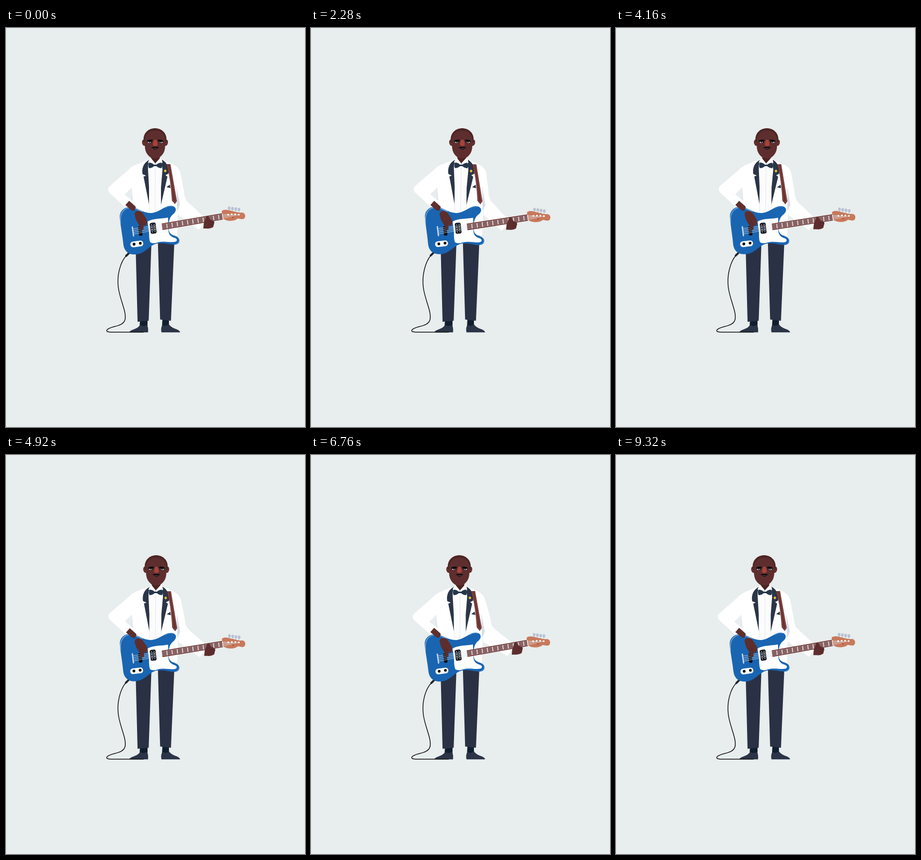
Recreate the animation shown at these times as an HTML page with a canvas. Size 600x800 px, loop 9.36 s.

```html
<!DOCTYPE html>
<html lang="en">
<head>
<meta charset="utf-8">
<title>Bass player</title>
<style>
  html, body { margin: 0; width: 100%; height: 100%; overflow: hidden; background: #e8eded; }
  canvas { display: block; width: 600px; height: 800px; }
</style>
</head>
<body>
<canvas id="stage" width="600" height="800"></canvas>
<script>
const ctx = document.getElementById('stage').getContext('2d');
const LOOP = 9360;
const INK = '#2b3547', CLOTH = '#2b3144', SKIN = '#5d2e2d', DEEP = '#4b2322';
const BLUE = '#1965b2', WOOD = '#6a302e', BLACK = '#0d0b0e', WHITE = '#fff';

function fill(color, d) {
  ctx.fillStyle = color;
  ctx.fill(new Path2D(d));
}

function line(color, width, d) {
  ctx.strokeStyle = color;
  ctx.lineWidth = width;
  ctx.stroke(new Path2D(d));
}

function oval(color, x, y, rx, ry = rx, turn = 0) {
  ctx.fillStyle = color;
  ctx.beginPath();
  ctx.ellipse(x, y, rx, ry, turn, 0, Math.PI * 2);
  ctx.fill();
}

// Rounded box centred on x, y
function box(color, x, y, w, h, r, turn) {
  group(() => {
    ctx.fillStyle = color;
    ctx.beginPath();
    ctx.roundRect(x - w / 2, y - h / 2, w, h, r);
    ctx.fill();
  }, 0, 0, turn, x, y);
}

function group(draw, dx, dy, angle = 0, px = 0, py = 0) {
  ctx.save();
  ctx.translate(px + dx, py + dy);
  ctx.rotate(angle);
  ctx.translate(-px, -py);
  draw();
  ctx.restore();
}

// Fretting hand offsets along the neck: [time, offset]
const slides = [[0, 0], [1480, -9], [3080, 0], [4160, 0], [5800, 4], [7880, 10.5], [9320, 0], [LOOP, 0]];

function slideAt(t) {
  const i = slides.findIndex(k => k[0] > t);
  const [t0, a] = slides[i - 1], [t1, b] = slides[i];
  const p = (t - t0) / (t1 - t0);
  return a + (b - a) * p * p * (3 - 2 * p);
}

function legs() {
  fill('#101f2f', 'M269 584H284V599H268Z M314 582H327V599H313Z');
  fill(INK, 'M247.5 610.3C249 604 264 605 269 595Q276 600 283 595Q286 601 285 610.3Z');
  fill(INK, 'M312 610.3Q310 601 314 595Q320 600 327 594C333 604 348 603 349.5 610.3Z');
  fill(CLOTH, 'M259.5 412H292.5L286.3 587L264 589Z M304.3 412H338.5L331 587L309.3 584.5Z');
}

function cable(dx, dy) {
  line(BLACK, 1.5, `M${242 + dx} ${456 + dy}C229 469 222 497 225.5 521C229 546 242 569 239 584
    C236 600 208 597 202.5 605.5C200 610 209 609.8 217 609.8H276`);
}

function jacket() {
  fill(WHITE, 'M285 264L266 272Q251 277 245 285L207 318Q202 325 208 331L243 363L255 348L238 334L252 320L256 380H343V345L347 283Q338 274 315 264Z');
  fill(WHITE, 'M256 365H345L343 416H290Z');
  fill('#e1e6ec', 'M252 321L254.5 347L251 344Z');
  fill('#fcfcfd', 'M287 268H312L312 368H287Z');
  line('#dfe2e7', 0.8, 'M299.5 280V366 M287.5 350V366 M311 352V364');
  fill(INK, 'M288 264C276 270 272 281 274 293L281 296L276 298L287 353L287 320L285 284L285 275Z');
  fill(INK, 'M313 264C324 270 327 281 326 292L320 295L324 298L311 354L311 320L314 284L313 275Z');
  fill(INK, 'M322 319L329 314L330 321Z');
  fill('#f4bd32', 'M319.5 283.3L322.5 286.5L319.5 289.7L316.5 286.5Z');
}

function fretArm(slide) {
  const dy = -slide * 0.22, elbow = slide * 0.5;
  fill(WHITE, `M325 270Q346 275 350 290L${357 + elbow} 327Q${358 + elbow} 341 ${363 + elbow} 347
    L${395 + slide} ${377 + dy}L${399 + slide} ${390 + dy}L${387 + slide} ${405 + dy}L346 375L342 330Z`);
  fill('#d6dce9', 'M342 318L349 354L344 366L343 350Z');
}

function strap() {
  fill(WOOD, 'M322 273L330 273L343 347L339 353L333 346Q330 300 322 273Z');
  line('#a87470', 0.6, 'M324.5 275Q331 302 335 345L339 350L341 346L329 275');
}

function neck(lean) {
  fill(DEEP, `M${291.5 + lean} 252H${308.5 + lean}L308.5 264L299.5 273L291 264Z`);
}

function collar() {
  fill(WHITE, 'M288 263L291 261L300 272L289 275L285 269Z M312 263L309 261L299 272L311 275L314 269Z');
  fill('#26364a', 'M287 270Q293 270 297 274H302Q306 270 312 270Q315 276 312 281Q306 281 302 277H297Q293 281 287 281Q284 276 287 270Z');
}

function head() {
  oval(SKIN, 277, 230, 4, 6.3, -0.2);
  oval(SKIN, 321, 230, 4, 6.3, 0.2);
  oval('#6c3633', 276.5, 230, 1.4, 3.2);
  oval('#6c3633', 321.5, 230, 1.4, 3.2);
  fill('#4d2524', 'M276 230V223C276 210 286.3 201 299 201C311.7 201 322 210 322 223V230Z');
  fill(SKIN, `M278 230C278 214 285 206 299 206C313 206 320 214 320 230L319 241
    C318 251 311 258 307 260Q299 263 291 260C287 258 280 251 279 241Z`);
  oval(BLACK, 288.5, 228.2, 4.6, 2.4);
  oval(BLACK, 310.5, 228.2, 4.6, 2.4);
  fill(WHITE, 'M284 228.6H291.5Q290 230.8 287.5 230.6Q285 230.6 284 228.6Z M307.5 228.6H315Q314 230.6 311.5 230.6Q309 230.8 307.5 228.6Z');
  oval(BLACK, 288.3, 229.2, 1.1);
  oval(BLACK, 310.8, 229.2, 1.1);
  line(BLACK, 2.5, 'M284 226.5Q288 224.5 293.5 225.2 M305.5 225.2Q311 224.5 315 226.5');
  fill('#a8423b', 'M296.5 225Q299.5 222.5 302.5 225L304.3 232Q305 236.5 299.5 236.5Q294 236.5 294.7 232Z');
  fill(BLACK, 'M292 241Q293 237.5 299 238.5Q306 237.5 307 241Q303 240 299.5 241Q296 240 292 241Z');
  fill(BLACK, 'M295 241Q299.5 239.5 304 241Q302 244 299.5 243.6Q297 244 295 241Z');
  line('#a9847f', 0.7, 'M297.5 241.6H301.5');
}

function guitarBody() {
  line('#1d2633', 4, 'M249 449L241 457');
  fill(BLUE, `M228.5 381C227 367 238 358 251 359C264 360 274 371 291 371C308 370 318 356 331 356.5
    C341 357 344 365 337 372C328 378 326 388 326.5 401C326 412 333 415 341 417.5C350 421 350 431 343 433.5
    C333 437 318 429 303 432C286 436 280 453 259 454C246 455 237 447 235.5 434C234 418 230 398 228.5 381Z`);
  line('#72a9df', 1.6, 'M230 392C227 371 237 360 251 360.5C260 361 266 366 273 368.5');
  line('#3d86cb', 1.2, 'M319 361Q327 356 334 358 M347 424Q348 431 341 433');
  fill(WHITE, `M284 388C296 381 312 383 325 380L326 402C325 416 333 419 339 421
    C344 423 344 427 340 428.5C331 431 319 426 304 430Q296 433 290 430Q287 427 287 410Z`);
  box(WHITE, 262.5, 433, 26, 11.5, 5.5, -0.13);
  oval(BLACK, 257, 433.4, 2.8);
  oval(BLACK, 269.5, 431.6, 2.8);
  box(BLACK, 269.5, 407, 7, 19, 2.5, -0.14);
  line('#c9d5e4', 2.6, 'M253.5 399L256 417');
  box('#17181f', 295.3, 401.3, 12, 22, 3.5, -0.12);
  for (let i = 0; i < 4; i++) {
    oval('#dfe3e9', 292 + i * 0.6, 394.5 + i * 4.8, 0.9);
    oval('#dfe3e9', 297.2 + i * 0.6, 393.8 + i * 4.8, 0.9);
  }
}

function guitarNeck() {
  for (let i = 0; i < 4; i++) oval('#b7c2d3', 448 + i * 6.5, 361.2 + i * 0.9, 2.7, 3.4);
  line('#b7c2d3', 1.2, 'M448 364V369 M454.5 365V370 M461 366V371 M467.5 367V372');
  fill('#c8795b', `M433 367C439 362 448 366 456 367.5C463 369 468 371 473 370
    C480 370 482 378 478 382C474 385 469 382 465 382C459 388 443 388 437 383L434 384Z`);
  oval('#a45a43', 455.5, 380, 1.7);
  fill(WOOD, 'M312.5 392L434 371.5L435 384L314 405Z');
  ctx.lineCap = 'butt';
  for (let i = 0; i < 11; i++) {
    const x = 323 + i * 10.4, y = 398.4 - (x - 313) * 0.169;
    line('#eee7e7', 1.7, `M${x - 0.6} ${y - 4.6}L${x + 0.6} ${y + 4.6}`);
  }
  for (let i = 0; i < 4; i++) {
    line('#d5dce5', 0.8, `M254 ${402.8 + i * 3.6}L313 ${394.2 + i * 2.8}L434 ${373.9 + i * 2.7}L${446 + i * 7} 374`);
  }
  line(WHITE, 1.3, 'M434 372L435.5 383');
  ctx.lineCap = 'round';
  for (let i = 0; i < 4; i++) oval(WHITE, 446 + i * 7, 374.2 - (i % 3 ? 0.7 : 0), 1.8);
}

function fretHand() {
  fill(SKIN, `M396 402L397 391L402 378Q405 375 407 379L410 384L417 387Q419 390 417 394
    L416 399Q410 403 403 402Z`);
  line(DEEP, 0.8, 'M409 389L417 390 M407 394L416 395');
}

function pluckArm(lift) {
  group(() => {
    fill(SKIN, 'M247 346.5L260 358Q261 362 256 367L251 365L239.5 355Z');
    line('#6d3835', 0.7, 'M246 350L256 359 M243 354L253 363');
  }, lift * 2, lift * 1.2);
  group(() => {
    fill(SKIN, `M258 374C258 366 266 365 273 369L282 383Q285 391 281 396Q278 398 276 394
      L276 403Q273 407 269 401L267 395L261 385Z`);
    line(DEEP, 0.8, 'M270 386L276 396 M267 389L272 402');
  }, 0, lift * 1.6, lift * -0.05, 264, 370);
}

function draw(t) {
  const sway = Math.sin(t * 0.000614 - 0.27) + 0.267;
  const lift = 0.5 - 0.5 * Math.cos(2 * Math.PI * (t / 320 - 0.06));
  const slide = slideAt(t);
  const lean = sway * 0.0104, tilt = sway * 0.014;
  const torso = part => group(part, 0, 0, lean, 300, 430);
  const guitar = part => group(part, 0, 0, tilt, 290, 400);

  ctx.fillStyle = '#e8eded';
  ctx.fillRect(0, 0, 600, 800);
  ctx.lineCap = ctx.lineJoin = 'round';

  legs();
  cable(-56 * tilt, -48 * tilt);
  torso(() => {
    jacket();
    fretArm(slide);
    strap();
    neck(sway * 1.6);
    collar();
  });
  group(head, sway * 3.7, 0);
  guitar(() => {
    guitarBody();
    guitarNeck();
    group(fretHand, slide, -slide * 0.168);
  });
  pluckArm(lift);
}

function tick(now) {
  draw(now % LOOP);
  requestAnimationFrame(tick);
}
draw(0);
requestAnimationFrame(tick);
</script>
</body>
</html>
```
